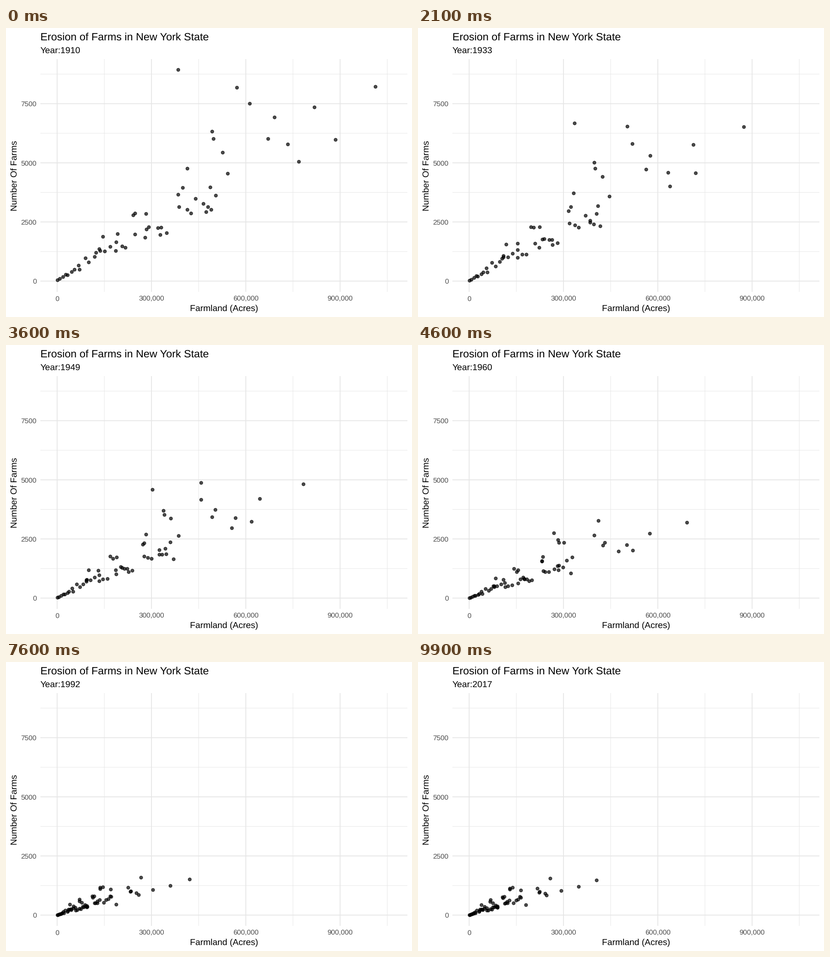
Write a matplotlib script that moves like this. It is 885 by 632 pixels and loops after 10000 ms.

```python
import numpy as np
import matplotlib.pyplot as plt
from matplotlib.animation import FuncAnimation

plt.rcParams["font.family"] = "Liberation Sans"
plt.rcParams["text.hinting"] = "none"

W, H, DPI = 885, 632, 100
FRAMES, INTERVAL = 100, 100
FIRST, LAST = 1910, 2017
PX = 72 / DPI  # points per pixel
GRID, TICK = "#E6E6E6", "#4D4D4D"

# Stage position of zero, and pixels per thousand acres and per farm
ORIGIN = np.array([111.5, 553.5])
SCALE = np.array([0.68533, -0.051733])

# Share of the first year's farmland and farms that is left
YEARS = [1910, 1933, 1949, 1960, 1977, 1992, 2017]
ACRES = [1, .82, .71, .60, .41, .31, .295]
FARMS = [1, .79, .585, .385, .23, .185, .18]

# Leading counties: thousand acres, farms, decline rate of each
LEADERS = np.array([
    (1012, 8224, .75, 1.0), (885, 5983, 1.05, 1.15), (818, 7355, .70, 1.05),
    (768, 5055, .95, 1.0), (732.5, 5789, .75, 1.0), (691, 6930, .93, 1.15),
    (670.5, 6021, .90, 1.05), (612, 7510, .85, 1.1), (571, 8186, .65, .97),
    (497, 6021, 1.1, 1.0), (492.5, 6330, 1.1, 1.0), (384.5, 8940, .70, 1.25),
    (145.5, 1885, 1.1, .85)])


def make_crowd(n):
    """Smaller counties, spread evenly along a noisy farms-per-acre slope."""
    rng = np.random.default_rng(4)
    noise = rng.normal(0, 1, (4, n)).clip(-1.8, 1.8)
    acres = 545 * np.linspace(0, 1, n) ** 1.1 * (1 + 0.05 * noise[0])
    farms = 40 + 8.1 * acres * np.exp(0.19 * noise[1])
    return np.column_stack([acres, farms, 1 + 0.1 * noise[2],
                            1 + 0.08 * noise[3]])


COUNTIES = np.vstack([make_crowd(48), LEADERS])


def positions(year):
    left = np.array([np.interp(year, YEARS, ACRES),
                     np.interp(year, YEARS, FARMS)])
    return ORIGIN + SCALE * COUNTIES[:, :2] * left ** COUNTIES[:, 2:]


fig = plt.figure(figsize=(W / DPI, H / DPI), dpi=DPI, facecolor="white")
ax = fig.add_axes([0, 0, 1, 1])
ax.set(xlim=(0, W), ylim=(H, 0))
ax.axis("off")


def label(x, y, text, size, color="black", **kw):
    return ax.text(x, y, text, fontsize=size * PX, color=color,
                   va="baseline", **kw)


def grid_line(xs, ys, width):
    ax.plot(xs, ys, color=GRID, lw=width * PX, snap=False,
            solid_capstyle="butt", zorder=1)


for n in range(8):
    x, y = ORIGIN + SCALE * (150 * n, 1250 * n)
    width = 0.93 if n % 2 else 1.87
    grid_line([x, x], [68, 577], width)
    grid_line([75, 875], [y, y], width)
    if n % 2 == 0:
        label(x, 596.5, f"{n * 150000:,}", 15.4, TICK, ha="center")
        label(66.8, y + 5.6, f"{n * 1250}", 15.4, TICK, ha="right")

label(75, 26.6, "Erosion of Farms in New York State", 23.3)
label(475.3, 619, "Farmland (Acres)", 19.25, ha="center")
label(23.6, 323, "Number Of Farms", 19.25, ha="center", rotation=90,
      rotation_mode="anchor")
subtitle = label(75, 54.8, "", 19.35)
dots = ax.scatter(*positions(FIRST).T, s=(6.84 * PX) ** 2, c="black",
                  edgecolors="black", linewidths=1.24 * PX, alpha=0.7,
                  zorder=3)


def update(i):
    year = FIRST + (LAST - FIRST) * i / (FRAMES - 1)
    subtitle.set_text(f"Year:{round(year)}")
    dots.set_offsets(positions(year))
    return subtitle, dots


anim = FuncAnimation(fig, update, frames=FRAMES, interval=INTERVAL,
                     repeat=True, repeat_delay=0)
plt.show()
```
